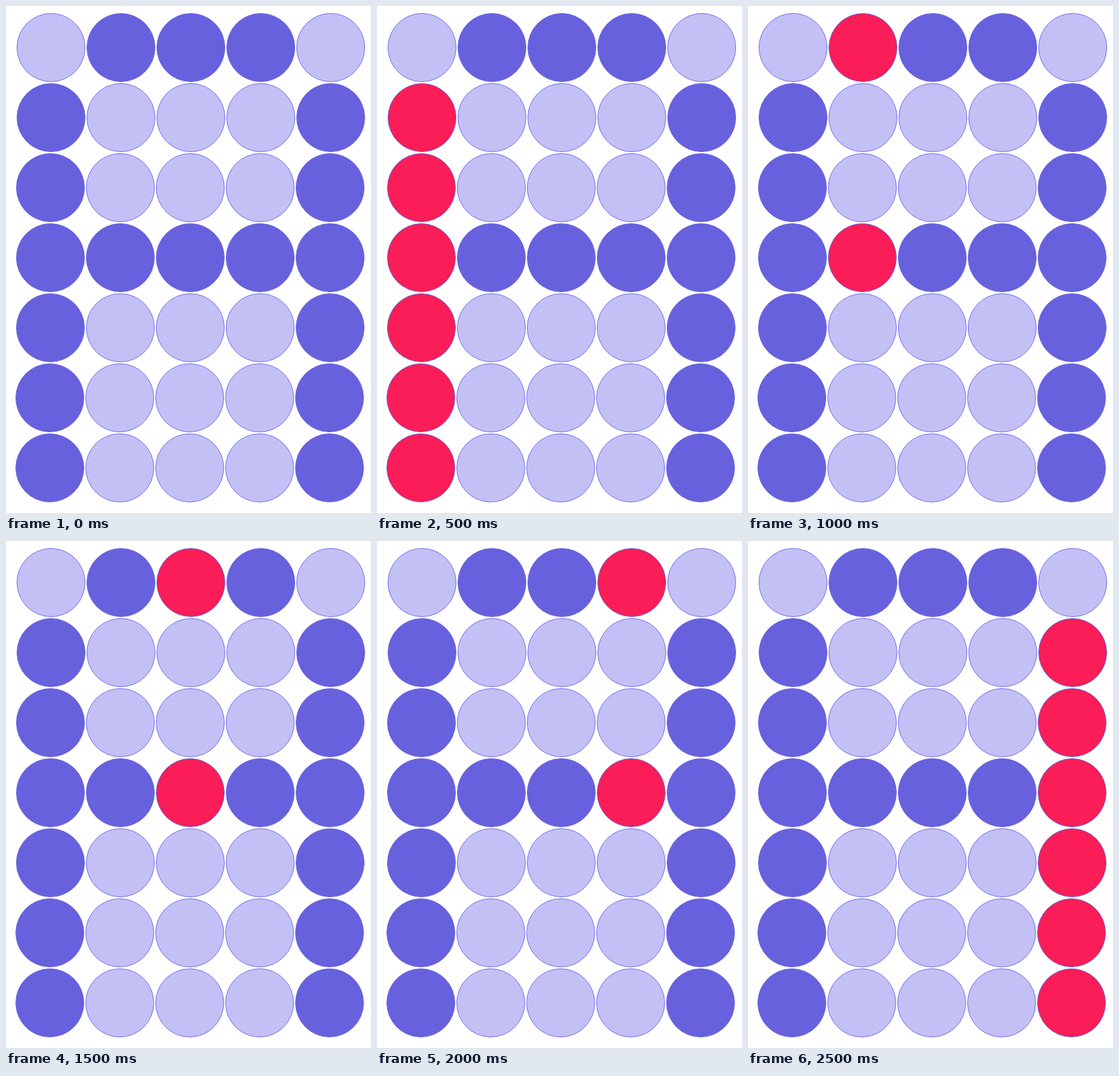
Recreate the animation shown at these times as an HTML page. Size 616 px wide and 854 px high, loop 3000 ms.

```html
<!DOCTYPE html>
<html lang="en">
<head>
<meta charset="utf-8">
<title>Dot matrix A</title>
<style>
  html, body { margin: 0; width: 100%; height: 100%; overflow: hidden; background: #fff; }
  svg { display: block; width: 616px; height: 854px; }
</style>
</head>
<body>
<svg id="stage" viewBox="0 0 616 854" xmlns="http://www.w3.org/2000/svg"></svg>
<script>
  const GLYPH = ['01110', '10001', '10001', '11111', '10001', '10001', '10001'];
  const PITCH = 118, STEP = 500, STEPS = 6;
  const OFF = ['#c3c0f5', '#6a62ee'];
  const ON = ['#6761de', '#6f69e2'];
  const SCAN = ['#fa1d57', '#5a74f2'];

  const stage = document.getElementById('stage');
  const lit = [];

  function paint(dot, [fill, stroke]) {
    dot.setAttribute('fill', fill);
    dot.setAttribute('stroke', stroke);
  }

  function addDot(row, col, on) {
    const dot = document.createElementNS(stage.namespaceURI, 'circle');
    // the grid leans slightly to the left going down
    dot.setAttribute('cx', 76 + col * PITCH - Math.floor((row + 1) / 3));
    dot.setAttribute('cy', 70 + row * PITCH);
    dot.setAttribute('r', 57.5);
    dot.setAttribute('stroke-width', 1);
    paint(dot, on ? ON : OFF);
    stage.appendChild(dot);
    if (on) lit.push({ dot, col });
  }

  GLYPH.forEach((line, row) => [...line].forEach((bit, col) => addDot(row, col, bit === '1')));

  // one idle step, then the scan passes over each column
  function draw(ms) {
    const scanCol = Math.floor(ms / STEP) % STEPS - 1;
    for (const { dot, col } of lit) paint(dot, col === scanCol ? SCAN : ON);
  }

  const start = performance.now();
  function tick() {
    draw(performance.now() - start);
    requestAnimationFrame(tick);
  }
  tick();
</script>
</body>
</html>
```
